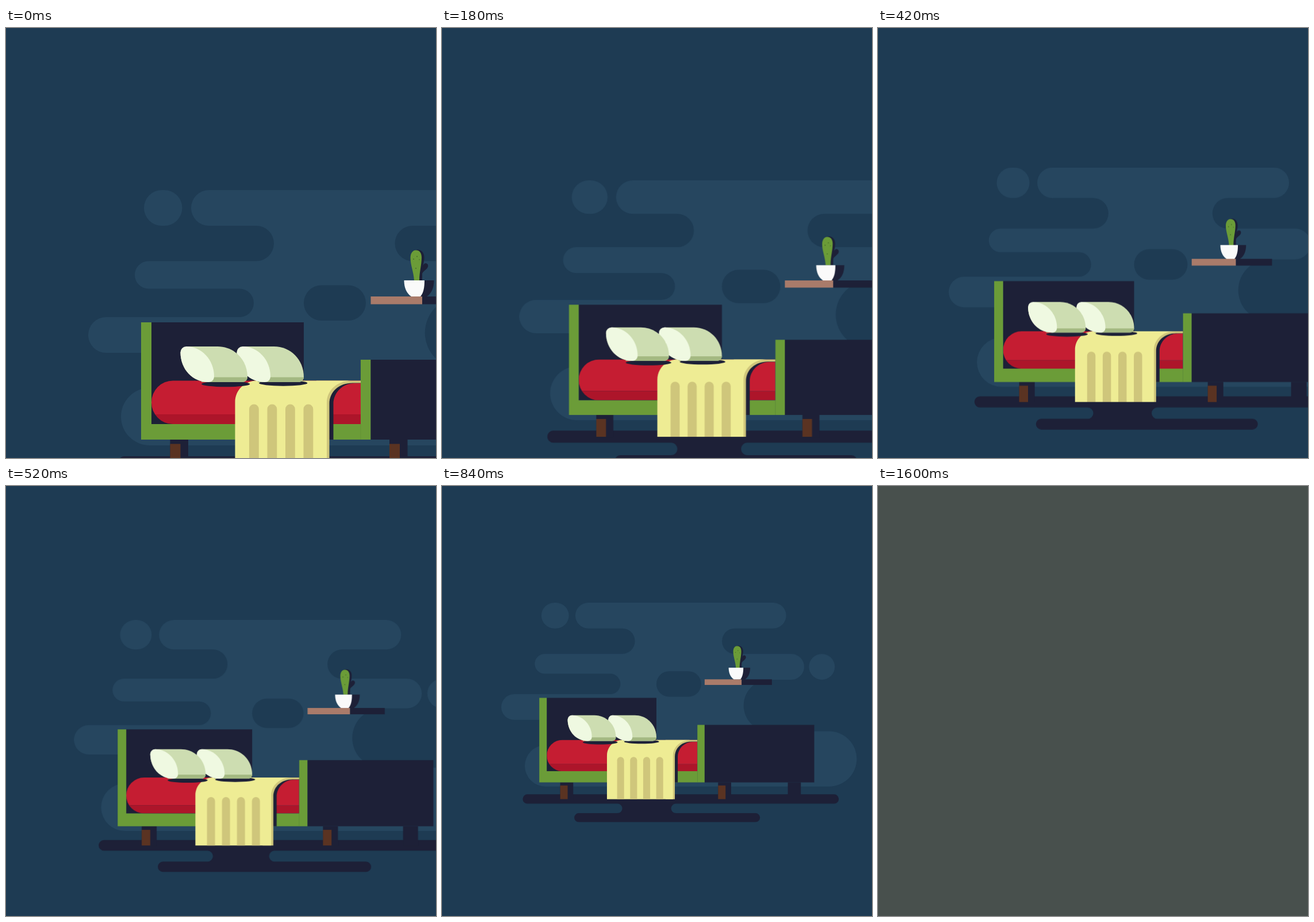
These frames come from a looping animation (748x748 px, 1620 ms). An HTML page:

```html
<!DOCTYPE html>
<html lang="en">
<head>
<meta charset="utf-8">
<title>Bedroom zoom</title>
<style>
  html, body { margin: 0; width: 100%; height: 100%; overflow: hidden; background: #1e3b53; }
  svg { display: block; width: 100%; height: 100%; }

  .room { transform-origin: 0 0; animation: zoom 1620ms infinite; }
  .flash { fill: #48504d; opacity: 0; animation: flash 1620ms step-end infinite; }

  /* one step every 20 ms for the first second, then hold */
  @keyframes zoom {
    0% { transform: scale(1); animation-timing-function: steps(50, end); }
    61.7%, 100% { transform: scale(.666667); }
  }
  @keyframes flash {
    0% { opacity: 0; }
    98.75%, 100% { opacity: 1; }
  }

  .wall { fill: #1e3b53; }
  .blob { fill: #26465f; }
  .navy { fill: #1d2037; }
  .green { fill: #6b9c38; }
  .red { fill: #c51d32; }
  .dark-red { fill: #ad152a; }
  .yellow { fill: #eeec94; }
  .olive { fill: #cfc67b; }
  .wood { fill: #5a3322; }
  .shelf { fill: #a97b6a; }
  .white { fill: #fafafa; }
  .spot { fill: #44702a; }
</style>
</head>
<body>
<svg viewBox="0 0 748 748">
  <defs>
    <clipPath id="bedding"><path d="M290.5 613.5H617V689H290.5A37.5 37.75 0 0 1 290.5 613.5Z"/></clipPath>
    <g id="pillow">
      <path fill="#cdddb1" d="M313.5 554H368C397 554 420 577 420 607C420 612 416 616 411 616H352C325 616 303.5 594 303.5 564Z"/>
      <path fill="#a4b982" d="M340 607.5H420C420 612 416 616 411 616H340Z"/>
      <path fill="#eff9e1" d="M313.5 554C340 554 362 577 362 606C362 612 358 616 352 616C325 616 303.5 594 303.5 564A10 10 0 0 1 313.5 554Z"/>
    </g>
    <g id="leg">
      <path class="navy" d="M0 716H31.5V757H0Z"/>
      <path class="wood" d="M0 723.5H18V756.5H0Z"/>
    </g>
    <path id="stripe" class="olive" d="M0 756.5V663A8.4 8.4 0 0 1 16.8 663V756.5Z"/>
  </defs>

  <g class="room">
    <!-- wall shapes -->
    <path class="blob" d="M353 282H800.5A31 31 0 0 1 800.5 344H707.25A30.75 30.75 0 0 0 707.25 405.5H843.75A31.25 31.25 0 0 1 843.75 468H791A62.25 62.25 0 0 0 791 592.5H935.25A66.75 66.75 0 0 1 935.25 726H250A50 50 0 0 1 250 626H300V565H174A31 31 0 0 1 174 503H406.25A24.75 24.75 0 0 0 406.25 453.5H248A24 24 0 0 1 248 405.5H435.25A30.75 30.75 0 0 0 435.25 344H353A31 31 0 0 1 353 282Z"/>
    <rect class="blob" x="240" y="282" width="66.5" height="62" rx="31"/>
    <rect class="blob" x="886.5" y="405.5" width="62.5" height="62.5" rx="31.25"/>
    <rect class="wall" x="518" y="447.5" width="108" height="61.5" rx="30.75"/>

    <!-- floor shadow -->
    <path class="navy" d="M206.25 745H947.25A11.25 11.25 0 0 1 947.25 767.5H565A11.5 11.5 0 0 0 565 790.5H757.5A10.75 10.75 0 0 1 757.5 812H330.25A10.75 10.75 0 0 1 330.25 790.5H424A11.5 11.5 0 0 0 424 767.5H206.25A11.25 11.25 0 0 1 206.25 745Z"/>

    <!-- shelf and cactus -->
    <path class="shelf" d="M634.5 467H724V480.5H634.5Z"/>
    <path class="navy" d="M724 467H797V480.5H724Z"/>
    <path class="navy" d="M712 386.5C720 383.5 727.5 389 727.5 399C727.5 405 726 410 725.5 414C726 410 729 408.5 731.5 409.5C735 411 735 415 732.5 418C729 422 724.5 424 724 428V439H717Z"/>
    <path class="green" d="M710 439C709 424 703.5 412 703.5 400C703.5 391 708 386.5 713 386.5C719 386.5 723 391 723 399C723 412 719 424 719 439Z"/>
    <g class="spot">
      <circle cx="709" cy="402" r="1"/>
      <circle cx="715" cy="397.5" r="1"/>
      <circle cx="719" cy="403" r=".8"/>
      <circle cx="713" cy="418" r="1"/>
    </g>
    <path class="navy" d="M726 439H744.5C744.5 452 740 462 732 467H718Z"/>
    <path class="white" d="M692.5 439H728C728 452 726 461 721 467H705C697 462 692.5 452 692.5 439Z"/>

    <!-- bed frame -->
    <use href="#leg" x="285.5"/>
    <use href="#leg" x="667"/>
    <path class="navy" d="M835.5 716H867V757H835.5Z"/>
    <path class="navy" d="M253 512H518V689H253Z"/>
    <path class="green" d="M235 512H253V689H617V716H235Z"/>

    <!-- mattress -->
    <g clip-path="url(#bedding)">
      <path class="red" d="M253 613H617V672H253Z"/>
      <path class="dark-red" d="M253 672H617V689H253Z"/>
    </g>

    <!-- blanket -->
    <path class="navy" d="M560 716V640L580 615H617V618H606C586 618 569.5 634 569.5 654V716Z"/>
    <path class="olive" d="M540 756.5V613.5H617V617.5H603C580 617.5 562.5 632 562.5 654V756.5Z"/>
    <path class="yellow" d="M398.5 756.5V651C398.5 630 415 613.5 436 613.5H600C576 614 558 630 558 652V756.5Z"/>
    <use href="#stripe" x="423"/>
    <use href="#stripe" x="454.5"/>
    <use href="#stripe" x="486"/>
    <use href="#stripe" x="517.5"/>

    <!-- pillows -->
    <ellipse class="navy" cx="382.2" cy="619.3" rx="42.2" ry="5"/>
    <ellipse class="navy" cx="482.2" cy="617.7" rx="42.2" ry="5"/>
    <use href="#pillow" x="98"/>
    <use href="#pillow"/>

    <!-- footboard -->
    <path class="green" d="M617 577H634.5V716H617Z"/>
    <path fill="#628f35" d="M616.5 689H617.2V716H616.5Z"/>
    <path class="navy" d="M634.5 577H899.3V716H634.5Z"/>
  </g>

  <rect class="flash" width="748" height="748"/>
</svg>
</body>
</html>
```
